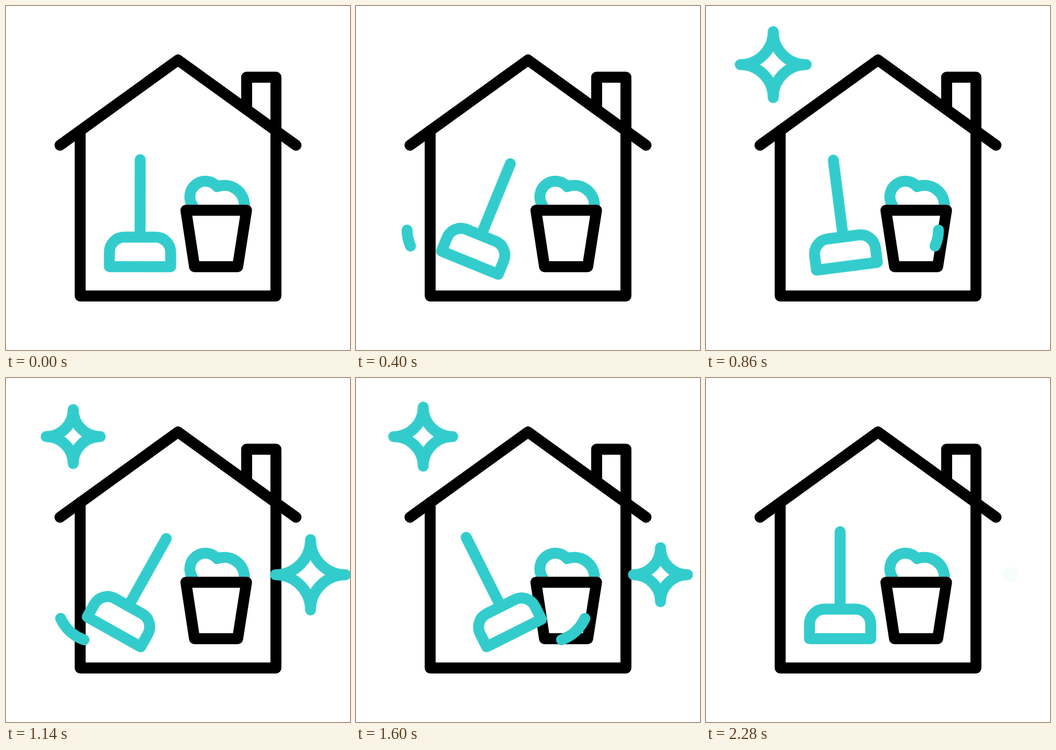
An HTML page for the animation above (2.4 s loop, 640x640 px).

```html
<!DOCTYPE html>
<html lang="en">
<head>
<meta charset="utf-8">
<title>House cleaning</title>
<style>
  html, body { margin: 0; width: 100%; height: 100%; overflow: hidden; background: #fff; }
  svg { display: block; width: 640px; height: 640px; }
  path { fill: none; stroke: #000; stroke-width: 20.4; stroke-linecap: round; stroke-linejoin: round; }
  .teal path { stroke: #33cccc; }

  .broom { transform-origin: 249.5px 385.5px; animation: sweep 2400ms infinite; }
  .swish { stroke-dasharray: 100 200; animation: swish 2400ms linear infinite backwards; }
  .star {
    vector-effect: non-scaling-stroke;
    animation: pulse 2400ms linear infinite backwards, fade 2400ms step-end infinite backwards;
  }
  .swish.right { animation-delay: 460ms; }
  .star.late { animation-delay: 300ms; }

  /* Two full swings, then rest */
  @keyframes sweep {
    0%, 37.5% { transform: rotate(0deg); animation-timing-function: cubic-bezier(.167, .167, .3, 1); }
    12.5%, 50% { transform: rotate(30deg); animation-timing-function: cubic-bezier(.72, 0, .28, 1); }
    25%, 62.5% { transform: rotate(-30deg); animation-timing-function: cubic-bezier(.333, 0, .667, .333); }
    75%, 100% { transform: rotate(0deg); }
  }
  /* Each stroke grows upwards, then leaves upwards */
  @keyframes swish {
    0%, 5.62% { stroke-dashoffset: 101; }
    18.96% { stroke-dashoffset: -101; }
    18.97%, 43.12% { stroke-dashoffset: 101; }
    56.46%, 100% { stroke-dashoffset: -101; }
  }
  @keyframes pulse {
    0%, 26.4% { transform: scale(0); }
    34.7% { transform: scale(1); }
    38.2%, 65.5% { transform: scale(.75); }
    69.8%, 72.2% { transform: scale(1); }
    82.5%, 100% { transform: scale(.06); }
  }
  @keyframes fade {
    0% { opacity: 0; }
    26.4% { opacity: 1; }
    82.45% { opacity: .05; }
    87.5%, 100% { opacity: 0; }
  }
</style>
</head>
<body>
<svg viewBox="0 0 640 640">
  <defs>
    <path id="swish" pathLength="100" d="M145 487A75 75 0 0 1 95 417"/>
  </defs>

  <path d="M138 232V539.5H502.2V132.5H447.7V186"/>
  <path d="M100.5 259L320 100.5L539.5 259"/>

  <g class="teal">
    <path d="M347 371A28.95 28.95 0 0 1 393 336A37.5 37.5 0 0 1 443.6 372"/>
  </g>
  <path d="M334.7 380H447.5L431 485H350.7Z"/>

  <g class="teal">
    <g class="broom">
      <path d="M249.5 286V430"/>
      <path d="M192.5 485V458A28 28 0 0 1 220.5 430H278.5A28 28 0 0 1 306.5 458V485Z"/>
    </g>
    <path class="swish" pathLength="100" d="M145 487A75 75 0 0 1 95 417"/>
    <path class="swish right" pathLength="100" d="M382.5 487A75 75 0 0 0 432.5 417"/>
    <g transform="translate(125 109)">
      <path class="star" d="M0-67A67 67 0 0 0 67 0A67 67 0 0 0 0 67A67 67 0 0 0-67 0A67 67 0 0 0 0-67Z"/>
    </g>
    <g transform="translate(566.5 366)">
      <path class="star late" d="M0-67A67 67 0 0 0 67 0A67 67 0 0 0 0 67A67 67 0 0 0-67 0A67 67 0 0 0 0-67Z"/>
    </g>
  </g>
</svg>
</body>
</html>
```
